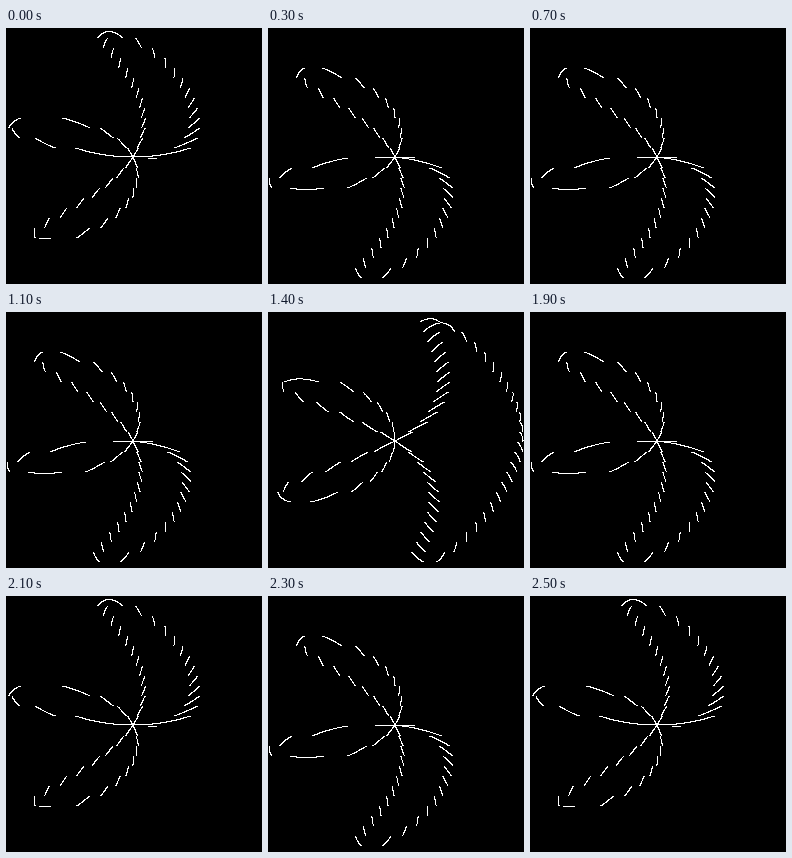
These frames come from a looping animation (256x256 px, 2.6 s). An HTML page with a canvas:

```html
<!DOCTYPE html>
<html>
<head>
<meta charset="utf-8">
<style>
html, body { margin: 0; width: 100%; height: 100%; overflow: hidden; background: #000; }
canvas { display: block; width: 100vw; height: 100vh; image-rendering: pixelated; }
</style>
</head>
<body>
<canvas id="stage" width="256" height="256"></canvas>
<script>
// A spinning three-petal rose seen through a rolling shutter:
// each band of rows is exposed one step of rotation after the band above.
const ctx = document.getElementById('stage').getContext('2d');
const BANDS = 25, BAND_H = 10, STEP = 6 * Math.PI / 180;
const CX = 127, CY = 129, R = 128, SAMPLES = 3600;

function drawBand(band, turn) {
  for (let s = 0; s < SAMPLES; s++) {
    const u = s / SAMPLES * Math.PI;
    const r = R * Math.sin(3 * u);
    const x = Math.floor(CX + r * Math.cos(u + turn));
    const y = Math.floor(CY + r * Math.sin(u + turn));
    if (Math.floor(y / BAND_H) === band) ctx.fillRect(x, y, 1, 1);
  }
}

function drawExposure(n) {
  ctx.fillStyle = '#000';
  ctx.fillRect(0, 0, 256, 256);
  ctx.fillStyle = '#fff';
  for (let i = 0; i < BANDS; i++) drawBand(i, (n * BANDS + i - 2) * STEP);
}

const start = performance.now();
let shown = -1;
function tick() {
  const t = (performance.now() - start) % 2600;
  const n = Math.max(0, Math.floor(t / 100) - 1);
  if (n !== shown) drawExposure(shown = n);
  requestAnimationFrame(tick);
}
tick();
</script>
</body>
</html>
```
